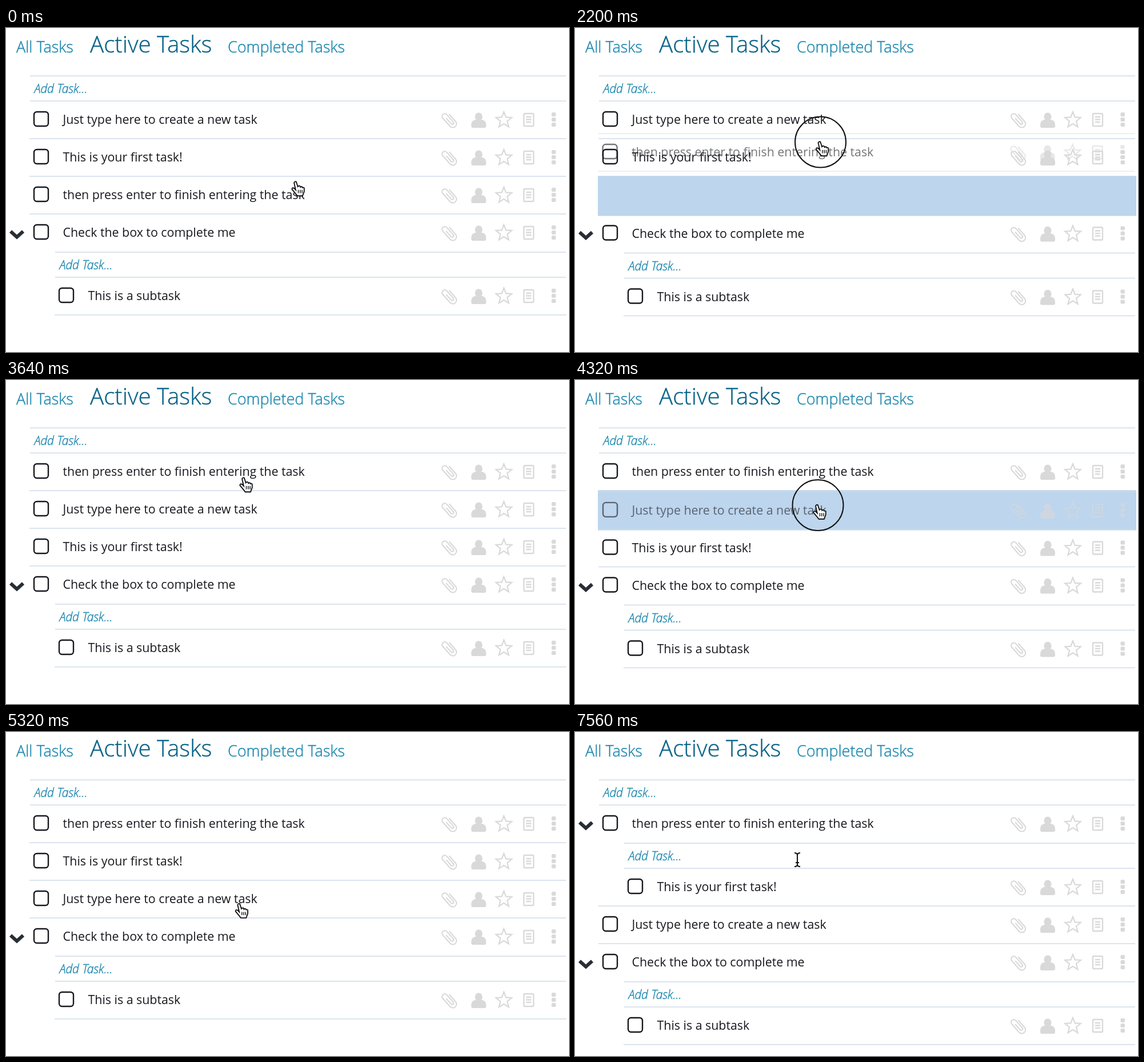
Write an HTML page with a canvas that moves like this. It is 985x568 px and loops after 7.6 s.

```html
<!DOCTYPE html>
<html lang="en">
<head>
<meta charset="utf-8">
<title>Task list</title>
<style>
  html, body { margin: 0; width: 100%; height: 100%; overflow: hidden; background: #fff; }
  canvas { display: block; }
</style>
</head>
<body>
<canvas id="stage" width="985" height="568"></canvas>
<script>
const ctx = document.getElementById('stage').getContext('2d');
const LOOP = 7600, STEP = 40, LAG = 27;
const FAMILY = '"Open Sans", "Noto Sans", sans-serif';
const LINK = '#1f88b0', INK = '#17191e', RULE = '#d3deea', ICON = '#d9d9d9';

const TEXT = {
  create: 'Just type here to create a new task',
  first: 'This is your first task!',
  enter: 'then press enter to finish entering the task',
  check: 'Check the box to complete me',
  sub: 'This is a subtask'
};

// Pointer path: time, x, y
const PATH = [
  [1400, 508, 270], [1760, 430, 285], [1960, 430, 285], [2200, 429.5, 200],
  [2400, 429, 138], [2760, 428, 117], [3080, 427, 130], [3640, 417, 172],
  [4040, 425, 215.5], [4240, 425, 215.5], [4800, 425, 312], [5000, 424, 333],
  [5160, 424, 335], [5600, 375, 224], [5720, 375, 224], [6120, 406, 224],
  [6320, 421, 224], [6560, 423, 224], [6960, 400, 222], [7400, 389, 224]
];

// Each drag lifts the row at "home"; moves are [time, new index]
const DRAGS = [
  { from: 1760, to: 3080, home: 2, moves: [[2240, 1], [2480, 0]] },
  { from: 4040, to: 5160, home: 1, moves: [[4840, 2]] },
  { from: 5640, to: 6560, home: 1, moves: [], nestAt: 6360 }
];

// Smooth monotone interpolation of one path column
function along(t, col) {
  const last = PATH.length - 1;
  if (t <= PATH[0][0]) return PATH[0][col];
  if (t >= PATH[last][0]) return PATH[last][col];
  const slope = i => i < 0 || i >= last ? 0
    : (PATH[i + 1][col] - PATH[i][col]) / (PATH[i + 1][0] - PATH[i][0]);
  const tangent = i => {
    const a = slope(i - 1), b = slope(i);
    return a * b > 0 ? 2 * a * b / (a + b) : 0;
  };
  const i = PATH.findIndex(p => p[0] > t) - 1;
  const span = PATH[i + 1][0] - PATH[i][0];
  const u = (t - PATH[i][0]) / span, v = 1 - u;
  return PATH[i][col] * (1 + 2 * u) * v * v + PATH[i + 1][col] * u * u * (3 - 2 * u)
    + span * u * v * (tangent(i) * v - tangent(i + 1) * u);
}

const pointer = t => ({ x: along(t, 1), y: along(t, 2) });

function stateAt(t) {
  const rows = ['create', 'first', 'enter', 'check'].map(id => ({ id }));
  rows[3].child = 'sub';
  let held = null;
  for (const d of DRAGS) {
    if (t < d.from) break;
    let index = d.home;
    for (const [time, to] of d.moves) if (t >= time) index = to;
    const [row] = rows.splice(d.home, 1);
    if (t < d.to) {
      const now = pointer(t - LAG), grab = pointer(d.from);
      held = {
        id: row.id,
        x: now.x - grab.x,
        y: 128 + 66 * d.home + now.y - grab.y
      };
      rows.splice(index, 0, { hole: true, indent: t >= d.nestAt ? 44 : 0 });
    } else if (d.nestAt) {
      rows[0].child = row.id;
    } else {
      rows.splice(index, 0, row);
    }
  }
  return { rows, held };
}

function label(text, x, y, font, color) {
  ctx.font = `${font} ${FAMILY}`;
  ctx.fillStyle = color;
  ctx.fillText(text, x, y);
}

// Light type, thickened slightly by an outline
function lightLabel(text, x, y, font, color) {
  label(text, x, y, font, color);
  ctx.lineWidth = 0.45;
  ctx.strokeStyle = color;
  ctx.strokeText(text, x, y);
}

function rule(x, y) {
  ctx.fillStyle = RULE;
  ctx.fillRect(x, y - 0.8, 980 - x, 1.6);
}

function stroke(path, width, color) {
  ctx.lineWidth = width;
  ctx.strokeStyle = color;
  ctx.stroke(path);
}

const CLIP = new Path2D('M-2.5-6V7a2.5 2.5 0 0 0 5 0V-10a4.7 4.7 0 0 0-9.4 0V9a6.5 6.5 0 0 0 13 0V-8');
const PERSON = new Path2D('M0-13a6.5 7 0 0 1 4.5 12q8.5 1 8.5 9v2.5q0 3-3 3h-20q-3 0-3-3v-2.5q0-8 8.5-9a6.5 7 0 0 1 4.5-12z');
const NOTE = new Path2D('M-7-11h14q1.5 0 1.5 1.5v19q0 1.5-1.5 1.5h-14q-1.5 0-1.5-1.5v-19q0-1.5 1.5-1.5zM-4.5-5h9M-4.5-.5h9M-4.5 4h9');
const CHEVRON = new Path2D('M8-5L19 5L30-5');
const HAND = new Path2D('M-3 2Q-2-1 1 0L4 9Q5 7 8 8Q9 9 9 10Q12 8 13 11Q17 10 16 14V18L13 26H3L-1 21L-7 14Q-7 10-3 12L0 15Z');
const FINGERS = new Path2D('M5 15v6M8.5 15v6M12 15v6');
const BEAM = new Path2D('M-5-12Q0-12 0-8Q0-12 5-12M0-9V9M-5 12Q0 12 0 8Q0 12 5 12M-3 5H3');
const STAR = new Path2D();
for (let i = 0; i < 10; i++) {
  const a = (i / 5 - 0.5) * Math.PI, r = i % 2 ? 6.3 : 14.5;
  STAR.lineTo(r * Math.cos(a), r * Math.sin(a));
}
STAR.closePath();

function at(x, y, draw, turn = 0) {
  ctx.save();
  ctx.translate(x, y);
  ctx.rotate(turn);
  draw();
  ctx.restore();
}

function icons(y) {
  at(776, y, () => stroke(CLIP, 2.1, ICON), -0.72);
  at(827, y + 0.5, () => { ctx.fillStyle = ICON; ctx.fill(PERSON); });
  at(871, y + 0.5, () => stroke(STAR, 2.2, ICON));
  at(914.5, y, () => stroke(NOTE, 2.3, ICON));
  ctx.fillStyle = ICON;
  for (const dy of [-13, -4, 5]) {
    ctx.beginPath();
    ctx.roundRect(954.5, y + dy, 7.5, 7, 2);
    ctx.fill();
  }
}

function task(id, top, indent = 0) {
  const box = new Path2D();
  box.roundRect(49 + indent, top + 19, 25, 25, 5);
  stroke(box, 2.4, INK);
  label(TEXT[id], 99.5 + indent, top + 40, '21.35px', INK);
  icons(top + 33);
}

function addField(top, indent = 0) {
  lightLabel('Add Task...', 49.5 + indent, top + 30, 'italic 300 21.1px', LINK);
  rule(42 + indent, top);
  rule(42 + indent, top + 44);
}

function list(rows) {
  let y = 128, hole = null;
  rows.forEach((row, i) => {
    if (row.hole) {
      hole = { x: 40 + row.indent, y: y - 0.5 };
      y += 67.5;
    } else {
      task(row.id, y);
      if (row.child) {
        at(0, y + 35.5, () => stroke(CHEVRON, 6, '#292d36'));
        addField(y + 67, 44);
        task(row.child, y + 111, 44);
        y += 177;
      } else {
        y += 66;
      }
    }
    rule(row.child && i === rows.length - 1 ? 85 : 41, y);
  });
  if (hole) {
    ctx.fillStyle = '#bdd5ed';
    ctx.fillRect(hole.x, hole.y, 982 - hole.x, 70);
  }
}

function cursor(t, pressed) {
  const { x, y } = pointer(t);
  if (pressed) {
    ctx.beginPath();
    ctx.arc(x, y, 44.5, 0, 7);
    ctx.lineWidth = 2;
    ctx.strokeStyle = '#111';
    ctx.stroke();
  }
  if (t >= 6680) {
    at(x, y, () => {
      stroke(BEAM, 4, '#fff');
      stroke(BEAM, 2, '#111');
    });
  } else {
    at(x - 1.2, y - 0.5, () => {
      ctx.scale(0.93, 0.95);
      ctx.fillStyle = '#fff';
      ctx.fill(HAND);
      stroke(HAND, 2, '#111');
      stroke(FINGERS, 1.5, '#111');
    });
  }
}

function draw(t) {
  const { rows, held } = stateAt(t);
  ctx.fillStyle = '#fff';
  ctx.fillRect(0, 0, 985, 568);
  lightLabel('All Tasks', 18, 43, '300 27px', LINK);
  lightLabel('Active Tasks', 147, 43, '300 40.3px', '#0b6488');
  lightLabel('Completed Tasks', 388, 43, '300 27px', LINK);
  addField(84);
  list(rows);
  if (held) {
    ctx.globalAlpha = 0.6;
    at(held.x, held.y, () => {
      rule(41, 0);
      task(held.id, 0);
      rule(41, 66);
    });
    ctx.globalAlpha = 1;
  }
  cursor(t, held);
}

const start = performance.now();
function tick() {
  const t = (performance.now() - start) % LOOP;
  draw(Math.floor(t / STEP) * STEP);
  requestAnimationFrame(tick);
}
tick();
</script>
</body>
</html>
```
